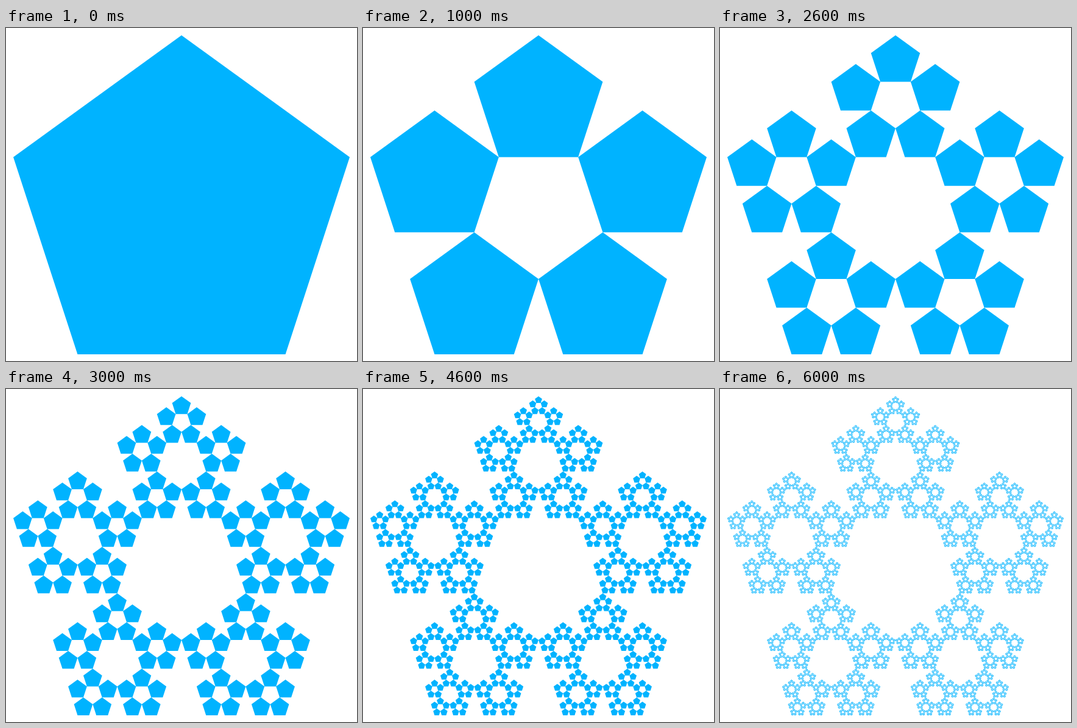
Write an HTML page with a canvas that moves like this. It is 576x548 px and loops after 7 s.

```html
<!DOCTYPE html>
<html lang="en">
<head>
<meta charset="utf-8">
<title>Pentaflake</title>
<style>
  html, body { margin: 0; width: 100%; height: 100%; overflow: hidden; background: #fff; }
  canvas { display: block; width: 576px; height: 548px; }
</style>
</head>
<body>
<canvas id="stage" width="576" height="548"></canvas>
<script>
  const ctx = document.getElementById('stage').getContext('2d');
  const LEVELS = 7, HOLD = 1000;
  const RADIUS = 290.2, CX = 288, CY = 302.1;
  const RATIO = (3 - Math.sqrt(5)) / 2; // child size relative to parent

  // Unit pentagon, first corner pointing up
  const corners = Array.from({ length: 5 }, (_, i) => {
    const a = i * Math.PI * 2 / 5;
    return [Math.sin(a), -Math.cos(a)];
  });

  function addPentagons(x, y, r, depth) {
    if (depth === 0) {
      corners.forEach(([u, v], i) => {
        ctx[i ? 'lineTo' : 'moveTo'](x + u * r, y + v * r);
      });
      ctx.closePath();
      return;
    }
    const shift = r * (1 - RATIO);
    for (const [u, v] of corners) {
      addPentagons(x + u * shift, y + v * shift, r * RATIO, depth - 1);
    }
  }

  function draw(level) {
    ctx.fillStyle = '#fff';
    ctx.fillRect(0, 0, 576, 548);
    ctx.fillStyle = '#00b3ff';
    ctx.beginPath();
    addPentagons(CX, CY, RADIUS, level);
    ctx.fill();
  }

  let shown = -1;
  const start = performance.now();

  function tick() {
    const elapsed = performance.now() - start;
    const level = Math.floor(elapsed / HOLD) % LEVELS;
    if (level !== shown) draw(shown = level);
    requestAnimationFrame(tick);
  }
  tick();
</script>
</body>
</html>
```
